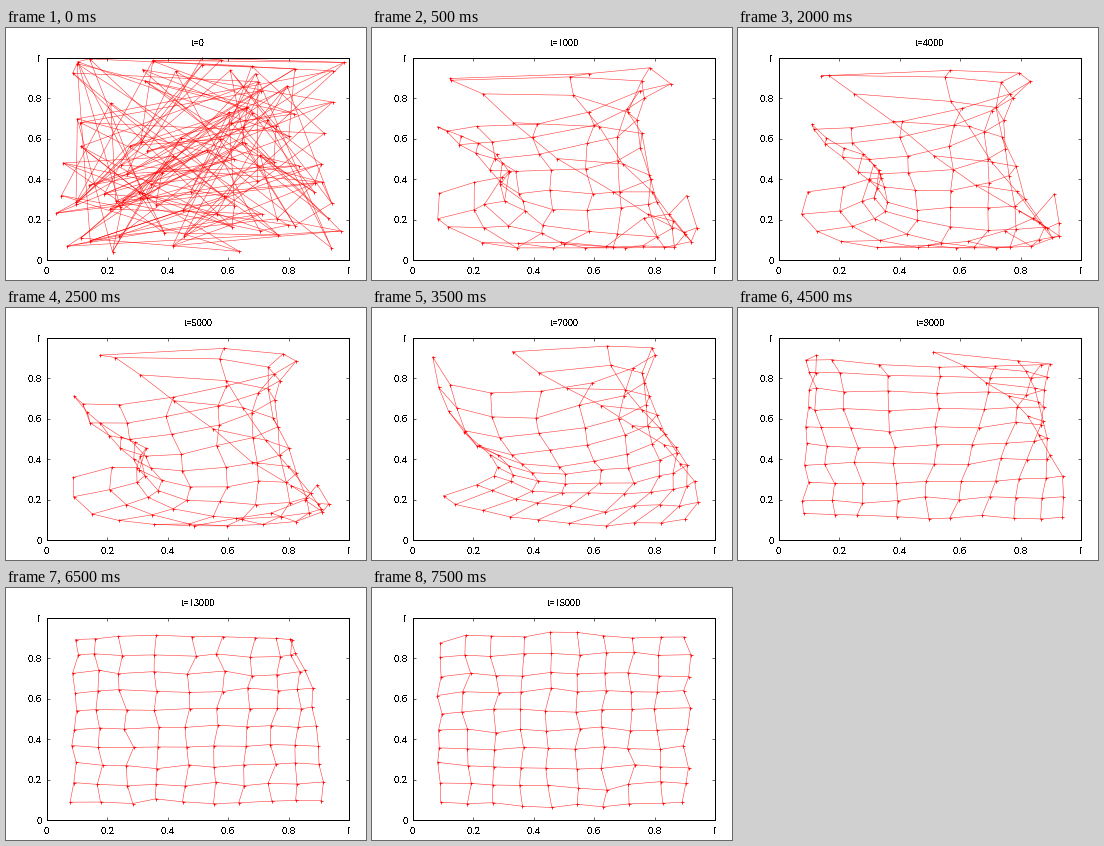
These frames come from a looping animation (360x252 px, 8000 ms). A matplotlib script:

```python
import numpy as np
import matplotlib.pyplot as plt
from matplotlib.animation import FuncAnimation

W, H, DPI = 360, 252, 100
PX = 72 / DPI
SIDE, STEPS = 10, 16
U = np.linspace(0, 1, SIDE)
FADE = 1.5  # how fast an edge loses its hold on the inside of the sheet

# Border of the folded sheet, four points per edge (corners shared), in percent,
# clockwise from the top left corner.
CRUMPLED = [(10, 65.5), (41, 69), (84, 88), (12.5, 90.5), (35, 69), (78, 22),
            (90.5, 33), (62.5, 10), (21, 9), (8.5, 33.5), (33, 42), (27, 51.5)]
UNROLLING = [(7, 90.5), (43, 74), (80, 91), (33, 92.5), (62, 66), (89, 38),
             (90, 10), (63.5, 7.5), (31.5, 11.5), (9, 21), (28, 37), (16, 54)]
CORNER_FOLD = [(12, 90.5), (33.5, 88), (85, 86), (51.5, 92.5), (76, 70), (90, 42),
               (93, 10), (67.5, 11.5), (38, 11.5), (8.5, 12.5), (9, 37.5), (10, 65.5)]


def curve(points):
    """Cubic through four evenly spaced points, sampled at the nodes."""
    return np.vander(U, 4) @ np.polyfit(np.arange(4) / 3, points, 3)


def patch(border):
    """Fill the border with a blended (Coons) sheet of nodes."""
    p = np.array(border) / 100
    top, right = curve(p[:4])[None], curve(p[3:7])[:, None]
    bottom, left = curve(p[6:10])[None, ::-1], curve(p[[9, 10, 11, 0]])[::-1, None]
    down = 1 - (1 - U[:, None, None]) ** FADE
    across = U[None, :, None] ** FADE

    def blend(a, b, mix):
        return (1 - mix) * a + mix * b

    corners = blend(blend(p[0], p[3], across), blend(p[9], p[6], across), down)
    return blend(top, bottom, down) + blend(left, right, across) - corners


def flat_sheet():
    x, y = np.meshgrid(0.085 + 0.82 * U, 0.89 - 0.79 * U)
    bow = 0.035 * np.sin(np.pi * x) * (2 * y - 1)
    return np.stack([x, y + bow], axis=-1)


# (step, sheet, easing power on the way to the next one)
KEYS = [(3, patch(CRUMPLED), 2), (7, patch(UNROLLING), 1),
        (9, patch(CORNER_FOLD), 0.7), (15, flat_sheet(), 1)]


def sheet_at(step):
    rng = np.random.default_rng(40 + step)
    if step == 0:
        return rng.uniform(0, 1, (SIDE, SIDE, 2))
    spread = 0.007 + 0.004 * max(0, 3 - step)
    noise = rng.normal(0, spread, (SIDE, SIDE, 2))
    for (t0, a, power), (t1, b, _) in zip(KEYS, KEYS[1:]):
        if step <= t1:
            mix = max(0, (step - t0) / (t1 - t0)) ** power
            return np.clip((1 - mix) * a + mix * b + noise, 0.06, 0.96)


plt.rcParams.update({"font.family": "Liberation Serif",
                     "text.antialiased": False})
fig = plt.figure(figsize=(W / DPI, H / DPI), dpi=DPI, facecolor="white")
left, right, top, bottom = 41, 343, 30, 232
ax = fig.add_axes([left / W, 1 - bottom / H,
                   (right - left) / W, (bottom - top) / H])
ax.set(xlim=(0, 1), ylim=(0, 1))
ticks = np.arange(6) / 5
labels = [f"{tick:g}" for tick in ticks]
ax.set_xticks(ticks, labels)
ax.set_yticks(ticks, labels)
ax.tick_params(direction="in", top=True, right=True, length=3 * PX,
               width=0.6 * PX, pad=5 * PX, labelsize=11.5 * PX)
ax.tick_params(axis="x", pad=6.5 * PX)
for spine in ax.spines.values():
    spine.set_linewidth(PX)

title = fig.text(192 / W, 1 - 15.5 / H, "", ha="center", va="center",
                 size=10.3 * PX)
strands = [ax.plot([], [], color="red", lw=0.55 * PX, alpha=0.8,
                   clip_on=False)[0] for _ in range(2 * SIDE)]
nodes, = ax.plot([], [], "+", color="red", ms=3 * PX, mew=0.8 * PX,
                 clip_on=False)


def draw(step):
    sheet = sheet_at(step)
    for strand, line in zip(strands, [*sheet, *sheet.transpose(1, 0, 2)]):
        strand.set_data(*line.T)
    nodes.set_data(*sheet.reshape(-1, 2).T)
    title.set_text(f"t={step * 1000}")
    return [*strands, nodes, title]


anim = FuncAnimation(fig, draw, frames=STEPS, interval=500,
                     repeat=True, repeat_delay=0, blit=False)
plt.show()
```
